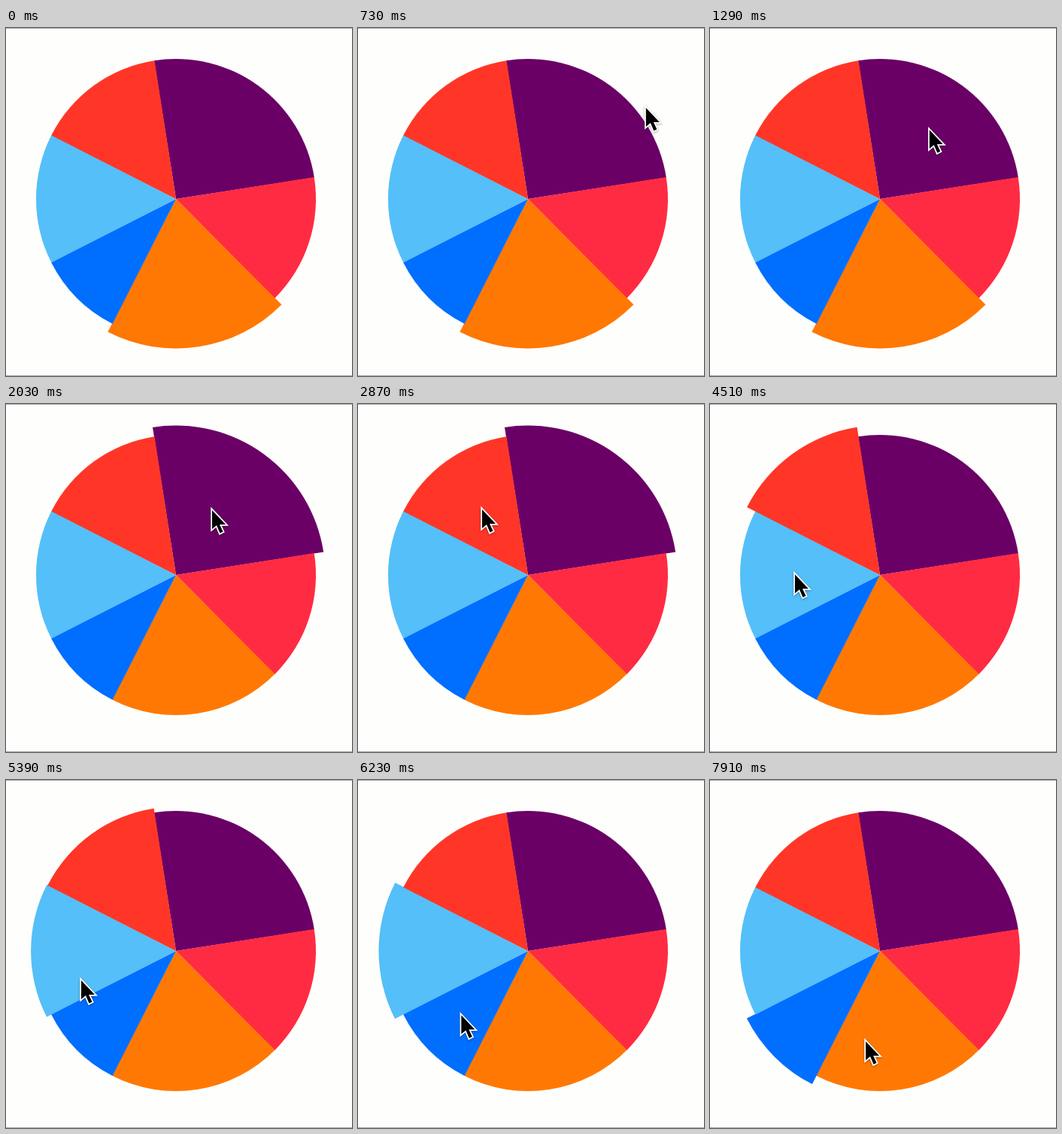
Animation of 460x462 px, one loop 8000 ms. Source, as an HTML page with a canvas:

```html
<!DOCTYPE html>
<html lang="en">
<head>
<meta charset="utf-8">
<title>Pie chart selection</title>
<style>
  html, body { margin: 0; width: 100%; height: 100%; overflow: hidden; background: #fefefc; }
  canvas { display: block; }
</style>
</head>
<body>
<canvas id="stage" width="460" height="462"></canvas>
<script>
const ctx = document.getElementById('stage').getContext('2d');
const LOOP = 8000;
const CENTER = [226, 227];
const RADIUS = 186;
const GROWTH = 12.5;
const OVERLAP = 0.003; // hides the seam between neighbouring slices

// Clockwise from the top; share is a percentage of the pie.
const slices = [
  { name: 'purple', color: '#6a0066', share: 25 },
  { name: 'red', color: '#ff2b42', share: 15 },
  { name: 'orange', color: '#ff7803', share: 20 },
  { name: 'blue', color: '#006fff', share: 10 },
  { name: 'sky', color: '#54bff8', share: 15 },
  { name: 'scarlet', color: '#ff3627', share: 15 },
];

// Each selection shrinks the previous slice while the new one grows.
const selections = [
  { name: 'orange', start: -1000, end: -900 },
  { name: 'purple', start: 1690, end: 1870 },
  { name: 'scarlet', start: 3520, end: 3670 },
  { name: 'sky', start: 5220, end: 5530 },
  { name: 'blue', start: 7000, end: 7170 },
];

// Pointer waypoints: time, x, y.
const pointerPath = [
  [0, 480, 30], [80, 464, 36], [730, 381, 102], [1400, 272, 137],
  [2110, 272, 137], [2870, 163, 136],
  [4070, 163, 136], [4510, 111, 222], [4690, 98, 262],
  [5930, 98, 262], [6230, 135, 308], [6430, 200, 372], [6610, 148, 340],
  [7720, 148, 340], [7910, 205, 343],
];

const arrow = new Path2D('M2 4V29L8 24L12.5 34.5L16.5 32.5L12 23H20Z');

const progress = (t, start, end) => Math.min(1, Math.max(0, (t - start) / (end - start)));

function pointerAt(t) {
  const next = pointerPath.findIndex(point => point[0] > t);
  if (next < 0) return pointerPath.at(-1).slice(1);
  const [t0, x0, y0] = pointerPath[next - 1];
  const [t1, x1, y1] = pointerPath[next];
  const k = progress(t, t0, t1);
  return [x0 + (x1 - x0) * k, y0 + (y1 - y0) * k];
}

function growthOf(name, t) {
  const index = selections.findIndex(selection => selection.name === name);
  if (index < 0) return 0;
  const { start, end } = selections[index];
  const following = selections[index + 1];
  const shrink = following ? progress(t, following.start, following.end) : 0;
  return GROWTH * (progress(t, start, end) - shrink);
}

function drawPie(t) {
  let angle = -99 * Math.PI / 180;
  for (const { name, color, share } of slices) {
    const end = angle + share / 50 * Math.PI;
    ctx.beginPath();
    ctx.moveTo(...CENTER);
    ctx.arc(...CENTER, RADIUS + growthOf(name, t), angle, end + OVERLAP);
    ctx.closePath();
    ctx.fillStyle = color;
    ctx.fill();
    angle = end;
  }
}

function drawPointer(t) {
  ctx.save();
  ctx.translate(...pointerAt(t));
  ctx.shadowColor = 'rgba(0, 0, 0, 0.35)';
  ctx.shadowBlur = 3;
  ctx.shadowOffsetY = 1;
  ctx.strokeStyle = '#fff';
  ctx.lineWidth = 3.5;
  ctx.stroke(arrow);
  ctx.shadowColor = 'transparent';
  ctx.fillStyle = '#000';
  ctx.fill(arrow);
  ctx.restore();
}

function draw(now) {
  const t = now % LOOP;
  ctx.fillStyle = '#fefefc';
  ctx.fillRect(0, 0, 460, 462);
  ctx.fillStyle = '#aaa';
  ctx.fillRect(0, 0, 460, 1);
  ctx.fillRect(0, 461, 460, 1);
  drawPie(t);
  drawPointer(t);
}

const began = performance.now();
function tick() {
  draw(performance.now() - began);
  requestAnimationFrame(tick);
}
tick();
</script>
</body>
</html>
```
